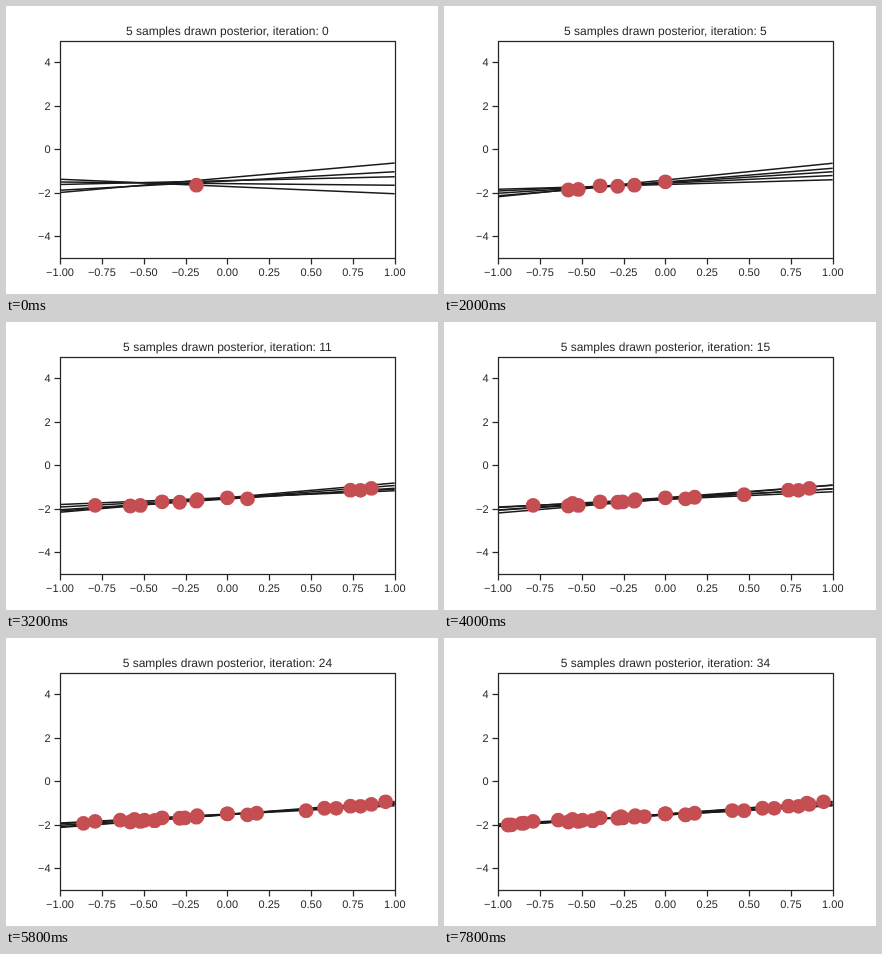
An HTML page with a canvas that plays this animation: 432 px wide and 288 px high, repeating every 8 s.

```html
<!DOCTYPE html>
<html lang="en">
<head>
<meta charset="utf-8">
<title>Posterior samples</title>
<style>
  html, body { margin: 0; width: 100%; height: 100%; overflow: hidden; background: #fff; }
  canvas { display: block; width: 432px; height: 288px; }
</style>
</head>
<body>
<canvas id="plot" width="432" height="288"></canvas>
<script>
const ctx = document.getElementById('plot').getContext('2d');
const LOOP = 8000;
const LEFT = 54, RIGHT = 388.8, TOP = 34.56, BOTTOM = 252;
const MID = (LEFT + RIGHT) / 2, HALF = (RIGHT - LEFT) / 2;
const INK = '#262626';

// Where the data is sampled, one place per iteration; some places repeat.
const samples = [
  -.185, 0, -.58, -.285, -.39, -.52, .735, -.79, .12, .86, -.18, .795,
  .175, -.555, .47, -.255, 0, -.435, .58, -.64, .65, -.495, .945, -.435, -.86,
  .845, -.92, .4, 0, -.94, -.125, 0, .12, -.845, -.265
];

// Noisy observations along a gentle curve.
const points = samples.map((u, i) => ({
  u,
  y: 177.1 - 11 * u - 1.8 * u * u + 1.4 * Math.cos((i - 2.3) * Math.PI * 2 / 3)
}));

function seeded(seed) {
  return () => {
    seed = (seed * 16807) % 2147483647;
    return seed / 2147483647;
  };
}

const mean = (list, key) => list.reduce((sum, p) => sum + p[key], 0) / list.length;

// Lines fan out around the centre of the data and tighten as it grows.
function sampleFits(step) {
  const seen = points.slice(0, step + 1);
  const u = mean(seen, 'u');
  const y = mean(seen, 'y') - 2 / (step + 1);
  const slope = -10.8 + 7 * Math.exp(-step);
  const spread = 11 / (1 + step / 6);
  const rand = seeded(step * 7919 + 31);
  rand();
  return [-1, -0.5, 0, 0.5, 1].map(q => {
    const m = slope + q * spread;
    const h = y + (rand() - 0.5) * spread * 0.6;
    return [h - m * (1 + u), h + m * (1 - u)];
  });
}

function iterationAt(ms) {
  return ms < 2000 ? Math.floor(ms / 400) : 5 + Math.floor((ms - 2000) / 200);
}

function line(x1, y1, x2, y2) {
  ctx.beginPath();
  ctx.moveTo(x1, y1);
  ctx.lineTo(x2, y2);
  ctx.stroke();
}

const snap = v => Math.round(v) + 0.5;
const signed = (v, digits) => (v < 0 ? '\u2212' : '') + Math.abs(v).toFixed(digits);

function setFont(size, align) {
  ctx.font = size + 'px "Liberation Sans", Arial, sans-serif';
  ctx.textRendering = 'geometricPrecision';
  ctx.textAlign = align;
  ctx.fillStyle = INK;
}

function drawAxes() {
  ctx.strokeStyle = INK;
  ctx.lineWidth = 1.25;
  const x0 = snap(LEFT), y0 = snap(TOP);
  ctx.strokeRect(x0, y0, snap(RIGHT) - x0, snap(BOTTOM) - y0);

  setFont(11, 'center');
  for (let v = -1; v <= 1; v += 0.25) {
    const x = MID + v * HALF;
    line(snap(x), 252.5, snap(x), 258.5);
    ctx.fillText(signed(v, 2), x, 270);
  }
  setFont(11, 'right');
  for (let v = -4; v <= 4; v += 2) {
    const y = (TOP + BOTTOM) / 2 - v * (BOTTOM - TOP) / 10;
    line(48.5, snap(y), 54.5, snap(y));
    ctx.fillText(signed(v, 0), 44.5, Math.round(y + 4));
  }
}

function draw(step) {
  ctx.fillStyle = '#fff';
  ctx.fillRect(0, 0, 432, 288);

  ctx.save();
  ctx.beginPath();
  ctx.rect(LEFT, TOP, RIGHT - LEFT, BOTTOM - TOP);
  ctx.clip();
  ctx.strokeStyle = '#1a1a1a';
  ctx.lineWidth = 1.5;
  for (const [a, b] of sampleFits(step)) line(LEFT, a, RIGHT, b);

  ctx.fillStyle = '#c44e52';
  for (const { u, y } of points.slice(0, step + 1)) {
    ctx.beginPath();
    ctx.arc(MID + u * HALF, y, 7.4, 0, Math.PI * 2);
    ctx.fill();
  }
  ctx.restore();

  drawAxes();
  setFont(12, 'center');
  ctx.fillText('5 samples drawn posterior, iteration: ' + step, MID, 29);
}

const start = performance.now();
let shown = -1;

function tick() {
  const step = iterationAt((performance.now() - start) % LOOP);
  if (step !== shown) draw(shown = step);
  requestAnimationFrame(tick);
}
tick();
</script>
</body>
</html>
```
